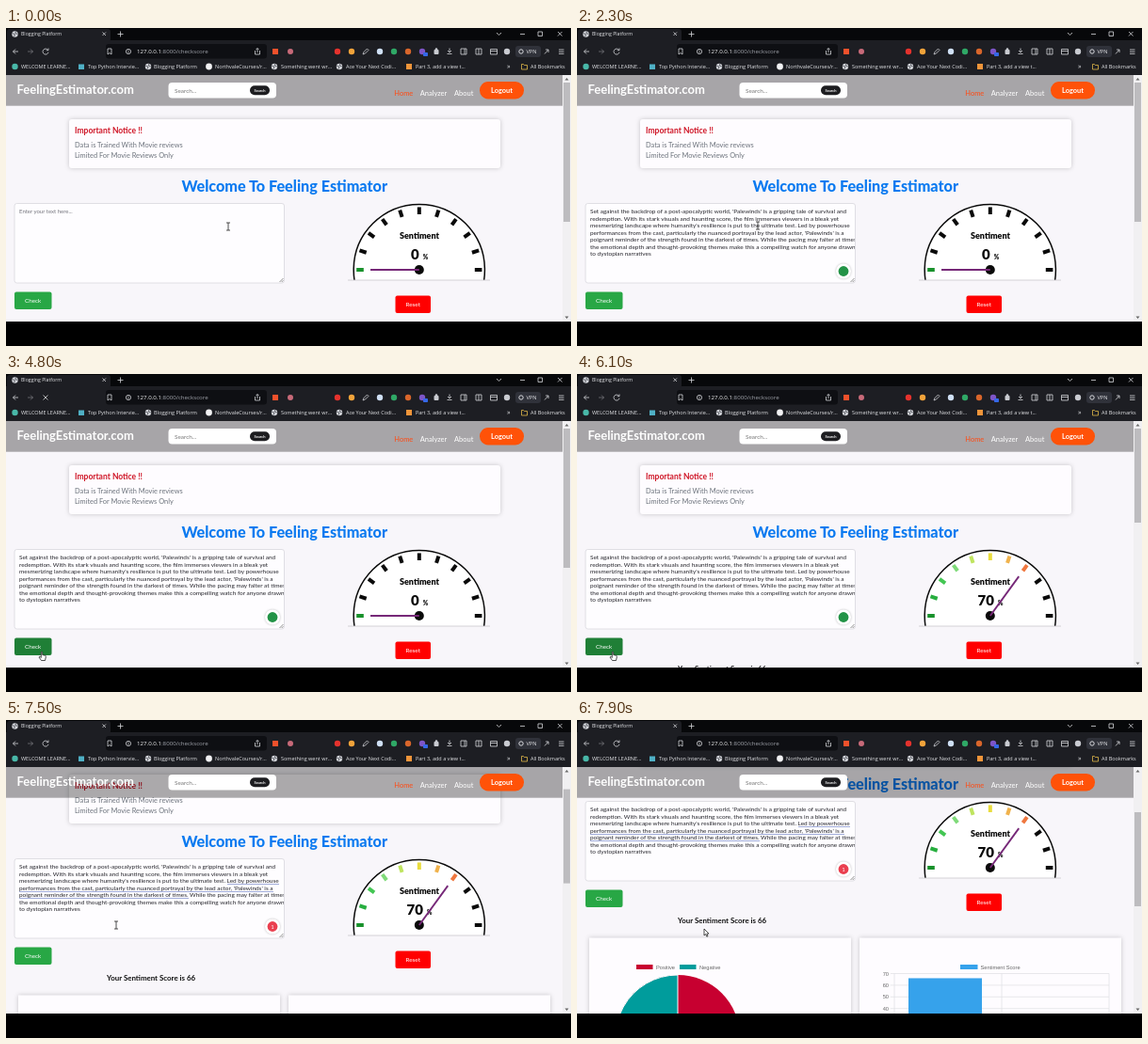
Animation of 600x338 px, one loop 8 s. Source, as an HTML page:

```html
<!DOCTYPE html>
<html lang="en">
<head>
<meta charset="utf-8">
<title>Review score page</title>
<style>
html, body { margin: 0; width: 100%; height: 100%; overflow: hidden; background: #000; }
svg { display: block; width: 600px; height: 338px; font-family: Lato, sans-serif; }
.ui { font-family: "Open Sans", sans-serif; }
.chart { font-family: "Liberation Sans", sans-serif; }
.card { fill: #fefcff; filter: drop-shadow(0 0 2.5px #0003); }
.line { fill: none; stroke: #d5d6da; stroke-width: .8; }
#review { font-size: 6.45px; line-height: 7.5px; white-space: pre; color: #26262c; }
.marked u { box-shadow: 0 .7px #7c8ccb; }
.lit u { background: #dfe7fb; box-shadow: 0 .8px #4d78d8; }
u { text-decoration: none; }
</style>
</head>
<body>
<svg id="stage" viewBox="0 0 600 338"></svg>
<script>
const text = (x, y, size, str, fill, more = '') =>
  `<text x="${x}" y="${y}" font-size="${size}" fill="${fill}" ${more}>${str}</text>`;
const rect = (x, y, w, h, fill, more = '') =>
  `<rect x="${x}" y="${y}" width="${w}" height="${h}" fill="${fill}" ${more}/>`;
const dot = (x, y, r, fill, more = '') => `<circle cx="${x}" cy="${y}" r="${r}" fill="${fill}" ${more}/>`;
const line = (d, more = '') => `<path class="line" d="${d}" ${more}/>`;
const globe = (x, y) => dot(x, y, 3.2, '#d3d5da') +
  line(`M${x - 3} ${y - 1}l3 1.2 -1 2.4M${x + 1} ${y - 3}l-.6 2 2.4 1`, 'style="stroke:#44474e"');
const bold = 'font-weight="700"', mid = 'text-anchor="middle"';

// Browser frame
const icons = [[352, '#e5322d'], [367, '#f2a33a'], [397, '#cfe0f5'], [412, '#2fa866'],
  [427, '#d9662b'], [442, '#7d55c7'], [532, '#c9cbd1']];
const marks = [[16, 'WELCOME LEARNE...'], [87, 'Top Python Intervie...'], [157, 'Blogging Platform'],
  [222, 'NorthvaleCourses/r...'], [292, 'Something went wr...'], [361, 'Ace Your Next Codi...'],
  [435, 'Part 3, add a view t...'], [557, 'All Bookmarks']];
const chrome = `<g class="ui">
  ${rect(0, 0, 600, 50, '#1d1e23')}${rect(0, 0, 600, 13, '#07080a')}
  ${rect(1, 1, 110, 14, '#1d1e23', 'rx="3"')}${globe(9.5, 6.5)}
  ${text(16, 8.4, 5.2, 'Blogging Platform', '#e6e7ea')}
  ${line('M102.500 4.500l3.500 3.500m0-3.500l-3.500 3.500M121.500 3.500v6m-3-3h6M521 5l2.500 2.500 2.500-2.500M546 6.500h5M565 4h4.500v4.500h-4.500zM586 4l4.500 4.500m0-4.500l-4.500 4.500')}
  ${line('M13 25H7.500l2.500-2.500m-2.500 2.500l2.500 2.500')}
  ${line('M23 25h5.500l-2.500-2.500m2.500 2.500l-2.500 2.500', 'opacity=".45"')}
  <g id="reload">${line('M44.500 23.300a3 3 0 1 0 .5 2.500M45 21.500v2.200h-2.200')}</g>
  <g id="stop">${line('M39.500 22.500l5 5m0-5l-5 5')}</g>
  ${rect(106, 17, 171, 15.500, '#0e0f13', 'rx="3"')}
  ${line('M108 22h4v6l-2-1.500-2 1.500zM264.500 24v4h5v-4M267 26v-4.500l-1.500 1.500m1.500-1.500l1.500 1.500')}
  ${dot(130, 25, 2.6, 'none', 'stroke="#d5d6da" stroke-width=".8"')}${line('M130 24.500v2M130 23v.7')}
  ${text(139, 27.200, 6.150, '127.0.0.1<tspan fill="#9fa2aa">:8000/checkscore</tspan>', '#f0f1f3')}
  ${rect(283, 22, 6, 6, '#f0512b')}${dot(302, 25, 3, '#c86a79')}
  ${icons.map(([x, c]) => dot(x, 25, 3.200, c)).join('')}
  ${rect(443, 26, 5, 4, '#3568e8', 'rx=".8"')}
  ${line('M379 28l1-2.500 3.500-3.500 1.500 1.500-3.500 3.500z')}
  ${rect(454.500, 23, 5, 5, '#c9cbd1', 'rx="1"')}${dot(457, 22.500, 1.300, '#c9cbd1')}
  ${line('M471 21.500v4.500m-2-2l2 2 2-2M468.500 27.500h5M499 22h6v6h-6zM502 22v6M514.500 22.500h7v5.500h-7zM514.500 24.500h7M483 22h6v6h-6zM487 22v6')}
  ${rect(541, 19, 27, 12, '#30323a', 'rx="3"')}${dot(547, 25, 2.200, 'none', 'stroke="#d5d6da"')}
  ${text(552.500, 27, 5.600, 'VPN', '#e6e7ea')}
  ${line('M572 27.500l4-4.500m-3 0h3v3M587 23h5.500m-5.500 2.200h5.500m-5.500 2.200h5.500')}
  ${dot(9.500, 41, 3.200, '#49b8a8')}${rect(77, 38.500, 6, 5.500, '#4fb0c5')}
  ${globe(151, 41)}${dot(215.500, 41, 3.400, '#f3f3f5')}${globe(285, 41)}${globe(354, 41)}
  ${rect(425, 38, 6, 6, '#f0953a')}
  ${marks.map(([x, s]) => text(x, 43, 5.500, s, '#e4e5e8')).join('')}
  ${text(532, 43, 7, '»', '#e4e5e8')}${line('M547.500 38.500h2l.8 1h3.200v4.500h-6z', 'style="stroke:#e0b849"')}
</g>`;

// Gauge: eleven marks over half a circle
const tints = ['#18912b', '#27ae3f', '#43c653', '#7fda79', '#bfe45f', '#e9dc3d', '#f0b24c', '#ef773f'];
const gauge = `<clipPath id="half"><path d="M360 180h160v88H360z"/></clipPath>
  <g clip-path="url(#half)">${dot(438.800, 257, 69.600, '#fff', 'stroke="#0a0a0a" stroke-width="1.500"')}</g>
  ${line('M363 268h151', 'style="stroke:#c9c7cc"')}
  ${Array.from({ length: 11 }, (_, i) =>
    rect(372.200, 255, 7.600, 4, '#0a0a0a', `class="tick" transform="rotate(${i * 18} 438.800 257)"`)).join('')}
  ${text(439, 223.500, 9, 'Sentiment', '#0a0a0a', mid + ' font-weight="900"')}
  <text x="439" y="245.500" ${mid} font-weight="900" fill="#0a0a0a" font-size="15"><tspan
    id="count">0</tspan><tspan dx="4" font-size="6.500">%</tspan></text>
  ${dot(438.800, 257, 5, '#0a0a0a')}
  <path id="needle" d="M438.800 257H387" stroke="#762878" stroke-width="1.900"/>`;

const review = `Set against the backdrop of a post-apocalyptic world, 'Palewinds' is a gripping tale of survival and
redemption. With its stark visuals and haunting score, the film immerses viewers in a bleak yet
mesmerizing landscape where humanity's resilience is put to the ultimate test. <u>Led by powerhouse
performances from the cast, particularly the nuanced portrayal by the lead actor, 'Palewinds' is a
poignant reminder of the strength found in the darkest of times.</u> While the pacing may falter at times,
the emotional depth and thought-provoking themes make this a compelling watch for anyone drawn
to dystopian narratives<span id="caret">|</span>`;

// Result charts, below the fold
const level = v => 369.500 + (70 - v) * 1.240;
const grid = [70, 60, 50, 40, 30].map(v =>
  line(`M333 ${level(v)}H565`, 'style="stroke:#e3e3e6"') +
  text(331, level(v) + 2, 5.700, v, '#666', 'text-anchor="end"')).join('');
const results = `<g id="results">
  ${text(107, 315.500, 7.900, 'Your Sentiment Score is 66', '#111', bold)}
  <g class="chart">${rect(13, 331.500, 278, 190, '', 'class="card"')}${rect(300, 331.500, 278, 190, '', 'class="card"')}
  ${rect(63, 360, 17.500, 5, '#c70030')}${text(84, 364.500, 5.700, 'Positive', '#666')}
  ${rect(109, 360, 17.500, 5, '#009c9c')}${text(130, 364.500, 5.700, 'Negative', '#666')}
  ${rect(407, 360, 18.500, 5, '#36a2eb')}${text(428.500, 364.500, 5.700, 'Sentiment Score', '#666')}
  ${dot(107, 437, 66, '#c70030')}
  <path d="M107 437V371A66 66 0 0 0 51 472z" fill="#009c9c" stroke="#fff"/>
  ${grid}${line('M337 369.500v120M451 369.500v120M565 369.500v120', 'style="stroke:#e3e3e6"')}
  ${rect(352, level(66), 78, 82, '#36a2eb')}</g></g>`;

const page = `<clipPath id="view"><path d="M0 50h600v262H0z"/></clipPath>
<g clip-path="url(#view)">${rect(0, 50, 600, 262, '#f8f6fa')}<g id="page">
  ${rect(67, 97, 458, 52, '', 'rx="3" class="card"')}
  ${text(73, 112.300, 8.500, 'Important Notice !!', '#cf1526', bold)}
  ${text(73, 126.700, 7.400, 'Data is Trained With Movie reviews', '#6c737c')}
  ${text(73, 138, 7.400, 'Limited For Movie Reviews Only', '#6c737c')}
  ${text(295.700, 173.700, 16.200, 'Welcome To Feeling Estimator', '#0b7af0', mid + ' font-weight="800"')}
  ${rect(9, 186.500, 286.500, 84.500, '#fefdff', 'rx="2.500" stroke="#d9d7de" stroke-width=".8"')}
  ${line('M290.500 270l4-4M292.700 270l1.800-1.800', 'style="stroke:#777"')}
  <g id="hint">${text(14, 197.300, 6, 'Enter your text here...', '#74747c')}</g>
  <foreignObject id="typed" x="14" y="191.300" width="281" height="60"><div id="review">${review}</div></foreignObject>
  <g id="badge">${dot(283, 258.500, 8, '#fff', 'style="filter:drop-shadow(0 .5px 1px #0004)"')}
    <circle id="spot" cx="283" cy="258.500" r="5.400"/>
    ${text(283, 260.800, 6, '1', '#fff', `${mid} id="issues"`)}</g>
  ${rect(9, 280.500, 39.500, 18.500, '#28a745', 'rx="2" id="check"')}${text(28.700, 292, 6.300, 'Check', '#fff', mid)}
  ${rect(413.500, 284.500, 37.500, 18.500, '#f00', 'rx="2"')}${text(432.200, 296, 6.400, 'Reset', '#fff', mid)}
  ${gauge}${results}</g>
  ${rect(0, 50, 591, 32.700, '#000', 'opacity=".33"')}
  ${text(11.500, 70.300, 13, 'FeelingEstimator.com', '#fff', bold)}
  ${rect(172.500, 58, 114.500, 16.500, '#fff', 'rx="4"')}${text(179, 68.700, 6.400, 'Search...', '#777')}
  ${rect(259, 61.300, 21, 10, '#1d1d20', 'rx="5"')}${text(269.500, 67.700, 4, 'Search', '#fff', mid + bold)}
  ${text(412.300, 71.700, 7.500, 'Home', '#ff4a12')}${text(439.700, 71.700, 7.500, 'Analyzer', '#fff')}
  ${text(476, 71.700, 7.500, 'About', '#fff')}
  ${rect(503, 57, 47, 18.500, '#ff5208', 'rx="9"')}${text(526.500, 69.200, 7.400, 'Logout', '#fff', mid + ' ' + bold)}
  ${rect(591, 50, 9, 262, '#f1f0f2')}${rect(592, 58, 7, 148, '#bdbcbf', 'id="thumb"')}
  <path d="M593.500 55.500h4l-2-2.500zM593.500 306.500h4l-2 2.500z" fill="#666"/>
  <g id="tip">${rect(58, 216, 84, 11.500, '#6d7078', 'rx="1.500" opacity=".88"')}
    ${text(100, 223.700, 5.700, 'Click for rewrite suggestions', '#fff', mid)}</g>
</g>`;

const pointers = `<g id="pointer" fill="#fff" stroke="#222" stroke-width=".8">
  <path class="shape" d="M-2-4H2M0-4V4M-2 4H2"/>
  <path class="shape" d="M0 0v7l1.600-1.400 1.200 2.600 1.200-.5-1.200-2.600h2.200z"/>
  <path class="shape" d="M-.7 0q.7-1 1.400 0v3l3 .7q.8.400.6 1.600l-.8 3.700h-4l-2.500-3.500q.2-1 1.300-.4l1 .9z"/></g>`;

const stage = document.getElementById('stage');
stage.innerHTML = chrome + page + pointers;
const get = id => document.getElementById(id);
const all = name => [...document.querySelectorAll(name)];
const show = (id, on) => { get(id).style.display = on ? '' : 'none'; };

// Linear track of [time, ...values]
function track(keys, t) {
  let i = 0;
  while (i < keys.length - 2 && t >= keys[i + 1][0]) i++;
  const [a, b] = [keys[i], keys[i + 1]];
  const p = Math.min(1, Math.max(0, (t - a[0]) / (b[0] - a[0])));
  return a.slice(1).map((v, k) => v + (b[k + 1] - v) * p);
}
const path = [[1600, 236, 211], [2300, 192, 210], [2700, 192, 210], [3400, 56, 294], [3700, 47, 303],
  [4000, 38, 295.500], [6300, 38, 295.500], [6900, 99, 214], [7300, 99, 214], [7700, 135, 222], [7900, 135, 222]];
const scrolls = [[7100, 0], [7300, 16.500], [7700, 61.500], [7900, 100]];
const [IBEAM, ARROW, HAND] = [0, 1, 2];

function draw(t) {
  const [x, y] = track(path, t), [scroll] = track(scrolls, t);
  const [value] = track([[5500, 0], [6100, 70]], t);
  const done = t >= 5500, typed = t >= 300, flagged = t >= 7100;
  const hover = t >= 3900 && t < 6500;

  get('page').setAttribute('transform', `translate(0 ${-scroll})`);
  get('thumb').setAttribute('y', 58 + scroll * .4);
  get('thumb').setAttribute('height', done ? 100 : 148);
  show('results', done);

  show('hint', !typed);
  show('typed', typed);
  show('badge', t >= 500);
  show('issues', flagged);
  get('spot').setAttribute('fill', flagged ? '#ea3f4f' : '#239347');
  const lit = t >= 7200 && t < 7500;
  get('review').className = lit ? 'lit' : flagged ? 'marked' : '';
  show('tip', lit);
  get('caret').style.visibility = t < 4000 && t % 1000 >= 500 ? 'visible' : 'hidden';

  get('check').setAttribute('fill', hover ? '#1f7f36' : '#28a745');
  const loading = t >= 4400 && t < 5500;
  show('stop', loading);
  show('reload', !loading);

  get('count').textContent = Math.round(value);
  get('needle').setAttribute('transform', `rotate(${value * 1.8} 438.8 257)`);
  all('.tick').forEach((el, i) => el.setAttribute('fill', value >= i * 10 ? tints[i] : '#0a0a0a'));

  const kind = hover ? HAND : (t >= 3000 && t < 3900) || t >= 7800 ? ARROW : IBEAM;
  get('pointer').setAttribute('transform', `translate(${x} ${y})`);
  all('.shape').forEach((el, i) => { el.style.display = i === kind ? '' : 'none'; });
}

const start = performance.now();
function tick() {
  const t = (performance.now() - start) % 8000;
  draw(Math.floor(t / 100) * 100);
  requestAnimationFrame(tick);
}
tick();
</script>
</body>
</html>
```
